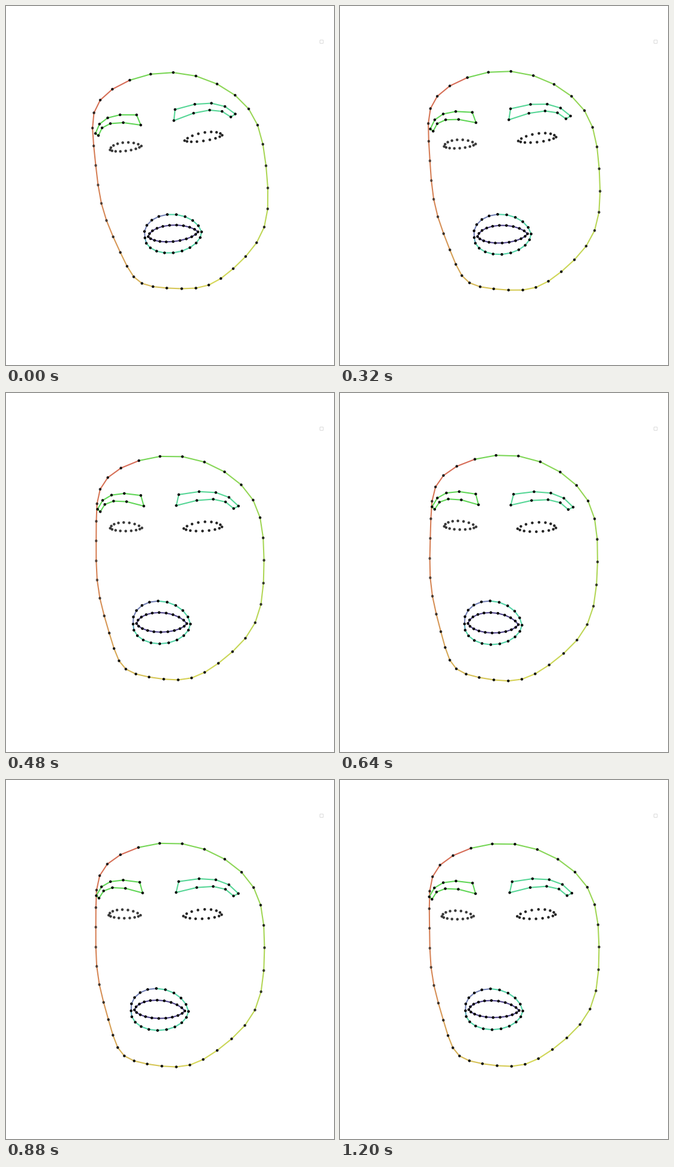
Write a matplotlib script that moves like this. It is 550 px wide and 600 px high and loops after 1280 ms.

```python
import colorsys

import matplotlib.pyplot as plt
import numpy as np
from matplotlib.animation import FuncAnimation
from matplotlib.collections import LineCollection
from matplotlib.patches import FancyBboxPatch

WIDTH, HEIGHT, DPI = 550, 600, 100
FRAMES, INTERVAL = 16, 80
TURN_FRAMES = 8
TURN_SPIN, DRIFT_SPIN = .14, -.025

# Points are complex numbers: x + y*1j, with y pointing down.


def xy(points):
    return np.column_stack([points.real, points.imag])


def hsv(hue, saturation=.6, value=.84):
    return colorsys.hsv_to_rgb(hue / 360, saturation, value)


def closed_curve(keys, count):
    """Smooth closed curve through evenly spaced keys, as a Fourier series."""
    size = len(keys)
    waves = np.fft.fftfreq(size, 1 / size)
    phase = 2j * np.pi * np.arange(count) / count
    return np.exp(np.outer(phase, waves)) @ np.fft.fft(keys) / size


def arc(start, middle, end):
    """Five dots on a parabola."""
    t = np.linspace(0, 1, 5)
    return (start * (1 - t) * (1 - 2 * t) + middle * 4 * t * (1 - t)
            + end * t * (2 * t - 1))


def almond(left, right, up, down, skew, count, even=.3):
    """Two arcs between corners; skew slides the upper dots sideways."""
    turn = np.arange(count) * 2 / count
    upper = turn < 1
    along = np.where(upper, turn, 2 - turn)
    bulge = np.sin(np.pi * along)
    mix = (1 - even) * (1 - np.cos(np.pi * along)) / 2 + even * along
    lift = np.where(upper, skew - 1j * up, 1j * down)
    return left + (right - left) * mix + lift * bulge


class Outline:
    def __init__(self, ax, points, turn, drift, colors=None, alpha=.95):
        self.points, self.turn, self.drift = points, turn, drift
        self.lines = None
        if colors is not None:
            self.lines = LineCollection([], colors=colors, linewidths=1.5, zorder=1)
            ax.add_collection(self.lines)
        black = [(0, 0, 0, a) for a in np.broadcast_to(alpha, len(points))]
        self.dots = ax.scatter(points.real, points.imag, s=10.5, linewidths=0,
                               c=black, zorder=2)

    def pose(self, turn, drift):
        points = xy(self.points + turn * self.turn + drift * self.drift)
        self.dots.set_offsets(points)
        if self.lines is not None:
            self.lines.set_segments(np.stack([points, np.roll(points, -1, 0)], 1))


def feature(ax, points, turn_shift, drift_shift, colors=None, alpha=.95,
            turn_open=0, drift_open=0):
    """Part that tilts with the head about its own centre, shifts and opens."""
    arm = points - points.mean()

    def move(shift, spin, opening):
        return shift + 1j * (spin * arm + opening * arm.imag)

    return Outline(ax, points, move(turn_shift, TURN_SPIN, turn_open),
                   move(drift_shift, DRIFT_SPIN, drift_open), colors, alpha)


def face(ax):
    keys = np.array([207 + 123.5j, 318 + 116.5j, 406.5 + 171.5j, 435.5 + 266.5j,
                     432.5 + 369j, 380.5 + 438.5j, 318 + 471j, 246 + 468.5j,
                     202.5 + 434.5j, 168 + 358j, 150 + 266j, 147 + 178j])
    i = np.arange(36)
    angle = 2 * np.pi * i / 36
    cos, sin = np.cos(angle), np.sin(angle)
    turn = (-8.8 + 27.5 * cos + 4.7 * sin
            + 1j * (-1.8 - 11.5 * cos + 17.1 * sin + 1.4 * np.sin(2 * angle)))
    drift = 1 - 6 * cos - 1.5 * np.cos(2 * angle) + 1j * (.3 + 3 * cos - 3.5 * sin)
    hues = np.interp(i, [0, 10, 20, 27, 35], [106, 76, 50, 23, 10])
    # Dots at both sides of the head fade with depth.
    alpha = (.92 - .34 * np.exp(-((i - 29) / 4) ** 2)
             - .2 * np.exp(-((i - 10) / 3) ** 2))
    return Outline(ax, closed_curve(keys, 36), turn, drift,
                   [hsv(h) for h in hues], alpha)


fig = plt.figure(figsize=(WIDTH / DPI, HEIGHT / DPI), dpi=DPI, facecolor="white")
ax = fig.add_axes([0, 0, 1, 1])
ax.axis("off")

# Empty legend frame.
ax.add_patch(FancyBboxPatch((526.8, 57.3), 3.8, 3.8, fc="white", ec="#dddddd", lw=.8,
                            boxstyle="round,pad=0.9,rounding_size=1"))

left_brow = np.append(arc(149.5 + 212.5j, 170 + 186.5j, 218.5 + 181.5j),
                      arc(225.5 + 198.5j, 174.5 + 196j, 154.5 + 216j))
right_brow = np.append(arc(283 + 172.5j, 344 + 162j, 384 + 180j),
                       arc(376.5 + 185j, 341 + 173.5j, 281 + 191j))
left_eye = almond(174 + 240j, 226.5 + 233.5j, 8.8, 5, -5, 16)
right_eye = almond(299 + 224.5j, 362 + 215.5j, 9.2, 5, 2.5, 16)
outer_lips = almond(232.5 + 387j, 327.5 + 377j, 34, 30, -10, 20, even=0)
inner_lips = almond(238 + 385j, 321.5 + 377j, 15, 12.2, -6, 20)
lip_colors = ["#7380b4"] * 5 + ["#52d3a6"] * 14 + ["#5aa8bb"]

outlines = [
    face(ax),
    feature(ax, left_brow, 6.5 - 18.6j, -5 + 4.3j, [hsv(115)]),
    feature(ax, right_brow, 7.2 + 3.7j, -2.3 - .5j, [hsv(150)]),
    feature(ax, left_eye, .9 - 14.2j, -4.1 + 4.5j, alpha=.77),
    feature(ax, right_eye, -.9 + 5.6j, -.7 + .2j, alpha=.85, turn_open=.13),
    feature(ax, outer_lips, -23.3 + 3.9j, 1.4 - 1j, lip_colors, 1, .12, -.07),
    feature(ax, inner_lips, -23.3 + 4.2j, 1.3 - 1.4j, ["#4f4389"], 1, .22, -.2),
]

# Whole coordinates fall on pixel centres.
ax.set_xlim(-.5, WIDTH - .5)
ax.set_ylim(HEIGHT - .5, -.5)


def draw(frame):
    t = min(frame / TURN_FRAMES, 1) ** 1.3
    turn = t ** 3 * (10 - 15 * t + 6 * t * t)
    rest = max(frame - TURN_FRAMES, 0) / (FRAMES - 1 - TURN_FRAMES)
    drift = np.sin(np.pi / 2 * rest)
    for outline in outlines:
        outline.pose(turn, drift)


animation = FuncAnimation(fig, draw, frames=FRAMES, interval=INTERVAL, repeat=True)
plt.show()
```
